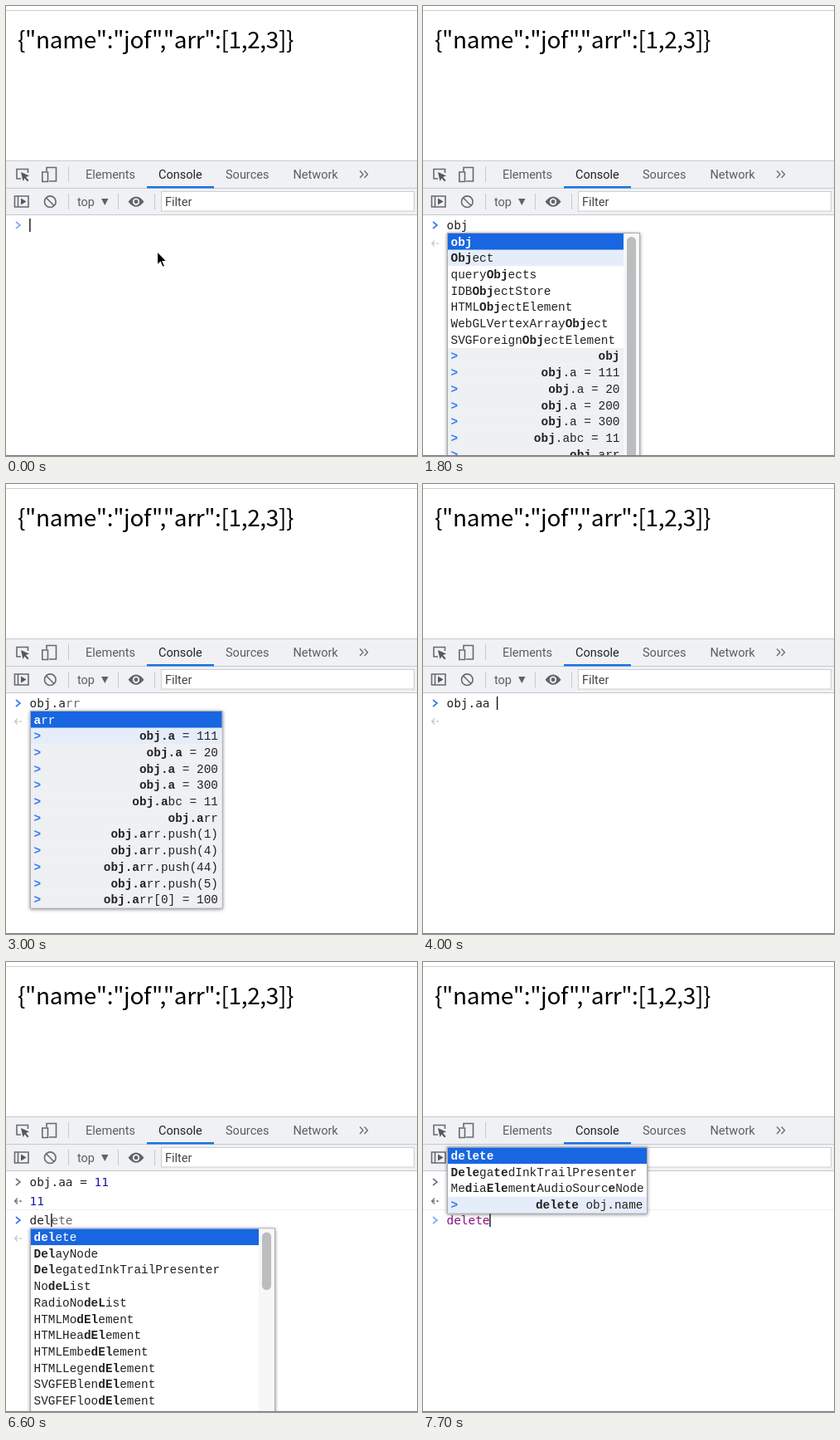
Write an HTML page that moves like this. It is 496 px wide and 542 px high and loops after 8000 ms.

```html
<!DOCTYPE html>
<html lang="en">
<head>
<meta charset="utf-8">
<title>Console session</title>
<style>
  html, body { margin: 0; width: 100%; height: 100%; overflow: hidden; background: #fff; }
  svg { display: block; }
  text { white-space: pre; }
  .ui { font: 14.5px Roboto, sans-serif; fill: #5a5d61; }
  .code { font: 14.4px "DejaVu Sans Mono", monospace; fill: #222; }
  .item { font: 14.4px "Liberation Mono", monospace; fill: #222; }
  .item .hit { font-weight: bold; }
  .icon { fill: none; stroke: #666a6e; stroke-width: 1.6; }
  .popup { fill: #fff; stroke: #a9abb0; filter: drop-shadow(0 1px 2px #0007); }
</style>
</head>
<body>
<svg width="496" height="542" viewBox="0 0 496 542">
  <path d="M0 5.5H496" stroke="#cfcfcf"/>
  <text x="14" y="51" style="font:28px 'Noto Sans CJK SC','Noto Sans CJK',sans-serif;letter-spacing:-.36px">{"name":"jof","arr":[1,2,3]}</text>

  <path d="M0 186H496V252H0Z" fill="#eff1f4"/>
  <path d="M0 186.5H496M0 219.5H496M0 251.5H496" stroke="#c6c9ce"/>
  <path d="M75.5 193V212M75.5 226V245M135.5 226V245M179.5 226V245" stroke="#c6c9ce"/>
  <path d="M170 217H251V219.5H170Z" fill="#1a73e8"/>
  <g class="ui">
    <text x="96" y="208">Elements</text>
    <text x="184" y="208" fill="#222" style="fill:#222">Console</text>
    <text x="265" y="208">Sources</text>
    <text x="346.5" y="208">Network</text>
    <text x="86" y="241">top</text>
  </g>
  <path d="M115 232H123.500L119.250 240Z" fill="#5f6368"/>
  <rect x="187.5" y="223.500" width="305" height="23.500" fill="#fff" stroke="#cbced3"/>
  <text class="ui" x="192" y="241" style="fill:#444">Filter</text>
  <g class="icon">
    <path d="M18 208H13V196.500H26.500V201"/>
    <path d="M49 199V194.500H60.500V211H52M43.800 200H50.500V211.500H43.800Z"/>
    <path d="M427 198.500L431 202.700L427 207M432.500 198.500L436.500 202.700L432.500 207" stroke-width="1.3"/>
    <path d="M10.500 229H27V242H10.500ZM14.500 229V242"/>
    <circle cx="53.300" cy="235.700" r="6.800"/>
    <path d="M48.500 231L58 240.500"/>
  </g>
  <path d="M18 200L28 204.500L24 206L27.500 210L26 211.500L22.500 207.500L20.500 211ZM18 231.500L24.500 235.500L18 239.500Z" fill="#55595d"/>
  <path d="M147.500 235.700Q157 223.500 166.500 235.700Q157 248 147.500 235.700Z" fill="#5f6368"/>
  <circle cx="157" cy="235.700" r="3.300" fill="#5f6368" stroke="#eff1f4" stroke-width="1.800"/>

  <g id="session"></g>
  <path d="M0 541.500H496" stroke="#77797c"/>
</svg>
<script>
const ROW = 19.7, CHAR = 8.67, LOOP = 8000, HOVER_Y = 300;
const BLUE = '#367cf1', PALE_BLUE = '#82aaf4', GREY = '#74777b', PALE = '#c9ccd0';

const history = ['obj.a = 111', 'obj.a = 20', 'obj.a = 200', 'obj.a = 300', 'obj.abc = 11', 'obj.arr',
  'obj.arr.push(1)', 'obj.arr.push(4)', 'obj.arr.push(44)', 'obj.arr.push(5)', 'obj.arr[0] = 100'];
const words = s => s.split(' ');

// thumb is the lower end of the scrollbar handle
const popups = {
  ob: { top: 274, right: 298, thumb: 490, past: [],
    items: words('obj observer Object offscreenBuffering atob Blob BlobEvent globalThis XRLightProbe AudioBuffer queryObjects IDBObjectStore ResizeObserver MutationObserver') },
  obj: { top: 274, right: 261.5, thumb: 560, past: ['obj', ...history],
    items: words('obj Object queryObjects IDBObjectStore HTMLObjectElement WebGLVertexArrayObject SVGForeignObjectElement') },
  members: { top: 274, right: 261.5, thumb: 530, items: ['arr', 'name'], past: history },
  arr: { top: 274, right: 261, items: ['arr'], past: history },
  del: { top: 321.5, right: 324.5, thumb: 395, past: [],
    items: words('delete DelayNode DelegatedInkTrailPresenter NodeList RadioNodeList HTMLModElement HTMLHeadElement HTMLEmbedElement HTMLLegendElement SVGFEBlendElement SVGFEFloodElement HTMLFieldSetElement') },
  delete: { top: 223.5, right: 270.5, past: ['delete obj.name'],
    items: words('delete DelegatedInkTrailPresenter MediaElementAudioSourceNode') }
};

// start ms, typed text | suggested rest, popup, caret hidden
const steps = [
  [0, ''], [300, '', , 1],
  [700, 'o'], [800, 'o|bj', 'ob'], [900, 'ob|j', 'ob'], [1200, 'obj', 'ob'], [1300, 'obj', 'obj'], [1800, 'obj', 'obj', 1],
  [1900, 'obj.'], [2000, 'obj.', 'members'], [2200, 'obj.a|rr', 'members'], [2300, 'obj.a|rr', 'arr'], [2800, 'obj.a|rr', 'arr', 1],
  [3100, 'obj.aa'], [3800, 'obj.aa', , 1], [4000, 'obj.aa '], [4100, 'obj.aa ='], [4300, 'obj.aa = '],
  [4500, 'obj.aa = 1'], [4700, 'obj.aa = 11'], [5300, 'obj.aa = 11', , 1],
  [5600, ''], [6000, 'd'], [6100, 'd|elete', 'del'], [6200, 'de|lete', 'del'], [6500, 'del|ete', 'del'],
  [6800, 'dele|te', 'del'], [7300, 'dele|te', 'del', 1], [7400, 'delet|e', 'del'], [7500, 'delet|e', 'delete'], [7600, 'delete', 'delete']
];

const rect = (x, y, w, h, fill, extra = '') => `<rect x="${x}" y="${y}" width="${w}" height="${h}" fill="${fill}" ${extra}/>`;
const text = (x, y, body, extra) => `<text x="${x}" y="${y}" ${extra}>${body}</text>`;
const span = (body, extra) => `<tspan ${extra}>${body}</tspan>`;
const prompt = (y, color) => `<path d="M12 ${y - 4}L17 ${y}L12 ${y + 4}" fill="none" stroke="${color}" stroke-width="1.7"/>`;
const result = (y, color) => `<path d="M14 ${y - 3.5}L10.500 ${y}L14 ${y + 3.500}M11 ${y}H14.500" fill="none" stroke="${color}" stroke-width="1.4"/>
  <circle cx="17.500" cy="${y}" r="1.200" fill="${color}"/>`;
const numbers = s => s.replace(/\d+/g, n => span(n, 'fill="#1a1aa6"'));

// Bold the query as one piece, or else letter by letter
function mark(word, query) {
  const at = word.toLowerCase().indexOf(query);
  let next = 0;
  return [...word].map((c, i) => {
    const hit = at >= 0 ? i >= at && i < at + query.length : c.toLowerCase() === query[next] && ++next;
    return hit ? span(c, 'class="hit"') : c;
  }).join('');
}

function drawPopup({ top, right, thumb, items, past }, query) {
  const edge = right - (thumb ? 19.5 : 0.5);
  const rows = [...items, ...past];
  let out = rect(29.5, top - 0.5, right - 29.5, rows.length * ROW + 1, '#fff', 'class="popup"');
  rows.forEach((word, i) => {
    const y = top + i * ROW, old = i >= items.length;
    const hover = y <= HOVER_Y && HOVER_Y < y + ROW;
    const fill = i === 0 ? '#1866e1' : hover ? '#e6edfa' : old ? '#eef0f4' : '#fff';
    out += rect(30, y, edge - 30, ROW + 0.1, fill);
    if (old) {
      out += text(33.5, y + 14.5, '&gt;', `class="item" style="fill:${BLUE};font-weight:bold"`);
      out += text(edge - 4.5, y + 14.5, mark(word, query), 'class="item" text-anchor="end"');
    } else {
      out += text(33.5, y + 14.5, mark(word, query.split('.').pop()), `class="item" ${i ? '' : 'style="fill:#fff"'}`);
    }
  });
  if (thumb) {
    out += rect(edge, top, 19, rows.length * ROW, '#f7f7f8');
    out += rect(edge + 4, top + 4, 11, thumb - top - 4, '#bcbdbf', 'rx="5.500"');
  }
  return out;
}

function draw([start, line, popup, hidden]) {
  const [typed, rest = ''] = line.split('|');
  const done = start >= 5600, y = done ? 311 : 264;
  const idle = !line || start >= 7400;
  const preview = !idle && (start < 4300 || done);
  let out = '';
  if (done) {
    out += prompt(265, GREY) + text(28.5, 270, numbers('obj.aa = 11'), 'class="code"');
    out += result(288, GREY) + text(28.5, 293, numbers('11'), 'class="code"');
    out += rect(0, 298, 496, 1, '#eeeeef');
  }
  out += prompt(y, idle ? PALE_BLUE : BLUE);
  if (preview) out += result(y + 22, PALE);
  const body = typed === 'delete' ? span(typed, 'fill="#881280"') : numbers(typed);
  out += text(28.5, y + 5, body + span(rest, 'fill="#666"'), 'class="code"');
  if (!hidden) out += rect(28.2 + typed.length * CHAR, y - 8, 1.4, 16, '#111');
  if (popup) out += drawPopup(popups[popup], typed);
  if (start < 700) {
    out += '<path d="M182.500 295.500V312L186.300 308.500L189 314.500L191.700 313.300L189 307.500H194Z" fill="#000" stroke="#fff" stroke-width="1.200"/>';
  }
  return out;
}

const session = document.getElementById('session');
let shown;
function tick() {
  const t = performance.now() % LOOP;
  const step = steps.findLast(s => s[0] <= t);
  if (step !== shown) session.innerHTML = draw(shown = step);
  requestAnimationFrame(tick);
}
tick();
</script>
</body>
</html>
```
